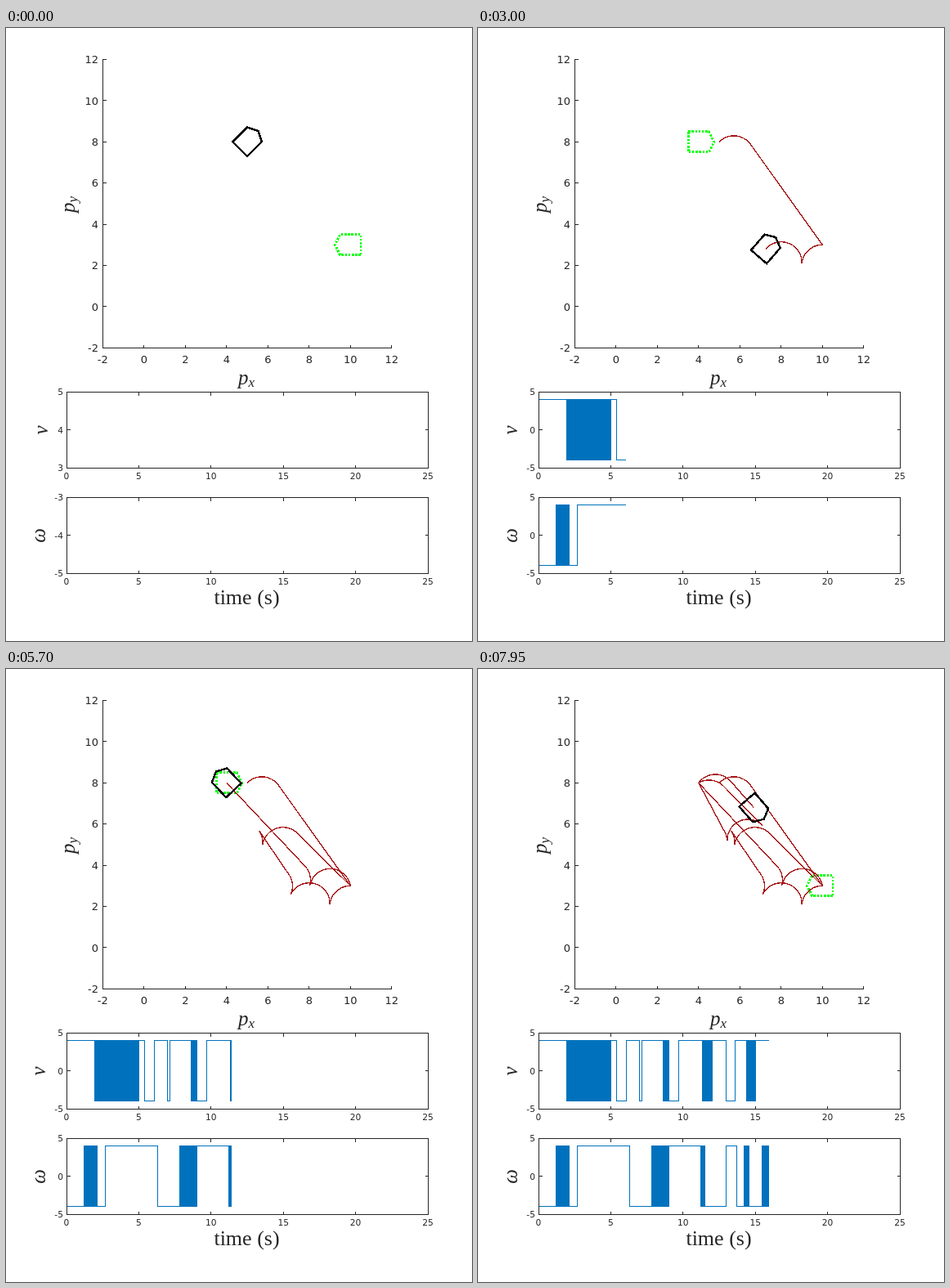
Recreate the animation shown at these times as an HTML page. Size 570 px wide and 750 px high, loop 8 s.

```html
<!DOCTYPE html>
<html lang="en">
<head>
<meta charset="utf-8">
<title>Vehicle path and control inputs</title>
<style>
html, body { margin: 0; width: 100%; height: 100%; overflow: hidden; background: #fff; }
svg { display: block; width: 570px; height: 750px; }
text { fill: #262626; font: 13px "DejaVu Sans", sans-serif; }
.small { font-size: 10.67px; }
.math { font: italic 25px "Liberation Serif", serif; }
.math .sub { font-size: 17px; }
.roman { font: 26px "Liberation Serif", serif; }
path, polyline, polygon { fill: none; shape-rendering: crispEdges; }
.axis { stroke: #262626; }
.signal { stroke: #0072bd; }
.block { fill: #0072bd; }
.trail { stroke: #a51214; stroke-width: 1.35; }
.goal { stroke: #0f0; stroke-width: 2.8; stroke-dasharray: 2.5 1.7; }
.robot { stroke: #000; stroke-width: 2.4; }
</style>
</head>
<body>
<svg id="stage" viewBox="0 0 570 750"></svg>
<script>
const stage = document.getElementById("stage");
const LOOP = 8000, STEP = 50, END = 16;
const RATE = 4, RAD = Math.PI / 180;
const { sin, cos } = Math;
const wrap = angle => (angle % (2 * Math.PI) + 2 * Math.PI) % (2 * Math.PI);
const crisp = n => Math.floor(n) + 0.5;

// Trips: back-up arcs [direction, turn, degrees], then a turn towards the goal and a straight drive
const east = { x: 10, y: 3, h: Math.PI }, west = { x: 4, y: 8, h: 0 };
const trips = [
  { goal: east, start: 0, side: -1, jitter: 0.74, park: { heading: -180, from: 2.13, to: 2.69 } },
  { goal: west, start: 5, side: 1, arcs: [[1, 1, 86], [-1, 1, 159]] },
  { goal: east, start: 6.97, side: -1, arcs: [[-1, -1, 42]], jitter: 0.75, park: { heading: -80 } },
  { goal: west, start: 9.02, side: 1, arcs: [[-1, 1, 157]], hold: 1, jitter: 0.13,
    park: { heading: 30, from: 11.53 } },
  { goal: east, start: 12, side: -1 },
  { goal: west, start: 13, side: 1, arcs: [[-1, 1, 138]], jitter: 0.19,
    park: { heading: 54, from: 14.54 } },
  { goal: east, start: 15.03, side: -1, jitter: 2 }
];

function travel({ x, y, h, v, w, start }, now) {
  const t = now - start, heading = h + w * t;
  if (!w) return { x: x + v * t * cos(h), y: y + v * t * sin(h), h };
  const r = v / w;
  return { x: x + r * (sin(heading) - sin(h)), y: y - r * (cos(heading) - cos(h)), h: heading };
}

// Each leg keeps constant speeds; a plotted value of 0 means fast switching
const legs = [];
let pose = { x: 5, y: 8, h: 45 * RAD }, clock = 0;

function addLeg(duration, v, w, speed, turn) {
  if (duration <= 0) return;
  const leg = { ...pose, start: clock, v, w, speed, turn };
  legs.push(leg);
  clock += duration;
  pose = travel(leg, clock);
}

const arc = (dir, turn, angle) => addLeg(angle / RATE, dir * RATE, turn * RATE, dir, turn);

function aim(goal, side) {
  const dx = goal.x - pose.x + side * sin(pose.h);
  const dy = goal.y - pose.y - side * cos(pose.h);
  const heading = Math.atan2(dy, dx) + side * Math.asin(1 / Math.hypot(dx, dy));
  arc(1, side, wrap(side * (heading - pose.h)));
}

function drive(goal, until, hold, jitter) {
  const distance = Math.hypot(goal.x - pose.x, goal.y - pose.y);
  const duration = Math.min(distance / RATE, until - clock);
  const shaky = Math.min(jitter, duration);
  addLeg(duration - shaky, RATE, 0, 1, hold);
  addLeg(shaky, RATE, 0, 1, 0);
}

function parkAt({ heading, from = clock, to }, until) {
  const gradual = from === clock;
  addLeg(from - clock, 0, 0, 0, 0);
  const duration = (to || until) - clock;
  addLeg(duration, 0, -wrap(pose.h - heading * RAD) / duration, 0, gradual ? 0 : -1);
  addLeg(until - clock, 0, 0, 0, 1);
}

trips.forEach(({ goal, side, arcs = [], hold = -1, jitter = 0, park }, i) => {
  const until = i + 1 < trips.length ? trips[i + 1].start : END;
  arcs.forEach(([dir, turn, degrees]) => arc(dir, turn, degrees * RAD));
  aim(goal, side);
  drive(goal, until, hold, jitter);
  if (park) parkAt(park, until);
});

const poseAt = now => travel(legs.filter(leg => leg.start <= now).pop(), now);

function add(tag, attrs, content = "") {
  const el = document.createElementNS("http://www.w3.org/2000/svg", tag);
  for (const key in attrs) el.setAttribute(key, attrs[key]);
  el.textContent = content;
  return stage.appendChild(el);
}

const label = (content, x, y, anchor, cls = "") =>
  add("text", { x, y, "text-anchor": anchor, class: cls }, content);

function mathLabel(sub, transform) {
  const text = add("text", { class: "math", transform }, "p");
  text.append(add("tspan", { class: "sub", dy: 3 }, sub));
}

// Map axes
const mapX = x => 118.3 + (x + 2) * 25.25;
const mapY = y => 391.2 - (y + 2) * 25.19;

let axes = "M118.5 38V391.5H472";
for (let n = -2; n <= 12; n += 2) {
  axes += `M118.5 ${crisp(mapY(n))}h4M${crisp(mapX(n))} 391.5v-4`;
  label(n, 113, mapY(n) + 4.7, "end");
  label(n, mapX(n), 409.5, "middle");
}
add("path", { d: axes, class: "axis" });
mathLabel("x", "translate(284 436)");
mathLabel("y", "translate(84 226) rotate(-90)");
label("time (s)", 294.5, 705, "middle", "roman");

// Signal plots
const timeX = t => 74 + t * 17.68;

function signalPlot(top, symbol, key, symbolX) {
  const mid = top + 46.5, bottom = top + 93;
  const changes = legs.filter((leg, i) => !i || leg[key] !== legs[i - 1][key]);
  const first = changes[0][key] * RATE;

  let frame = `M74.5 ${top}H516.5V${bottom}H74.5Z`;
  frame += `M74.5 ${crisp(mid - 0.5)}h4M516.5 ${crisp(mid - 0.5)}h-4`;
  for (let t = 0; t <= 25; t += 5) {
    const x = crisp(timeX(t));
    frame += `M${x} ${top}v4M${x} ${bottom}v-4`;
    label(t, timeX(t), bottom + 13.5, "middle", "small");
  }
  const blocks = add("path", { class: "block" });
  const line = add("path", { class: "signal" });
  add("path", { d: frame, class: "axis" });
  const ticks = [top, mid, bottom].map(y => label("", 70, y + 3.7, "end", "small"));
  const name = label(symbol, 0, 0, "middle", "math");

  return now => {
    const wide = now >= changes[1].start;
    const yOf = v => crisp(wide ? mid - v * 37.2 - 0.3 : mid - 0.5);
    ticks.forEach((tick, i) => tick.textContent = wide ? 5 - 5 * i : first + 1 - i);
    name.setAttribute("transform",
      `translate(${wide ? 47.5 : symbolX} ${mid}) rotate(-90)`);

    let lines = "", rects = "", previous = 0;
    changes.forEach((change, i) => {
      if (change.start >= now) return;
      const value = change[key], next = changes[i + 1];
      const x1 = crisp(timeX(change.start));
      const x2 = crisp(timeX(next ? Math.min(now, next.start) : now));
      if (value) {
        lines += `M${x1} ${yOf(previous || value)}V${yOf(value)}H${x2}`;
      } else {
        rects += `M${x1 - 0.5} ${yOf(1) - 0.5}H${x2 + 0.5}V${yOf(-1) + 0.5}H${x1 - 0.5}Z`;
      }
      previous = value;
    });
    line.setAttribute("d", lines);
    blocks.setAttribute("d", rects);
  };
}

const drawSpeed = signalPlot(445.5, "ν", "speed", 51);
const drawTurn = signalPlot(574.5, "ω", "turn", 47.5);

// Vehicle and goal
const body = [[-0.5, 0.5], [0.5, 0.5], [0.75, 0], [0.5, -0.5], [-0.5, -0.5]];
const point = (x, y) => `${mapX(x).toFixed(2)},${mapY(y).toFixed(2)}`;
const outline = ({ x, y, h }) => body.map(([u, v]) =>
  point(x + u * cos(h) - v * sin(h), y + u * sin(h) + v * cos(h))).join(" ");

const trailPoints = Array.from({ length: END * 100 }, (_, i) => {
  const { x, y } = poseAt(i / 100);
  return point(x, y);
});

const goalShape = add("polygon", { class: "goal" });
const trail = add("polyline", { class: "trail" });
const robot = add("polygon", { class: "robot" });

function draw(ms) {
  const step = Math.floor((ms % LOOP) / STEP);
  const now = step / 10;
  const trip = trips.filter(({ start }) => Math.round(start) <= now).pop();
  goalShape.setAttribute("points", outline(trip.goal));
  trail.setAttribute("points", trailPoints.slice(0, step * 10 + 1).join(" "));
  robot.setAttribute("points", outline(poseAt(now)));
  drawSpeed(now);
  drawTurn(now);
}

const began = performance.now();
function tick() {
  draw(performance.now() - began);
  requestAnimationFrame(tick);
}
tick();
</script>
</body>
</html>
```
